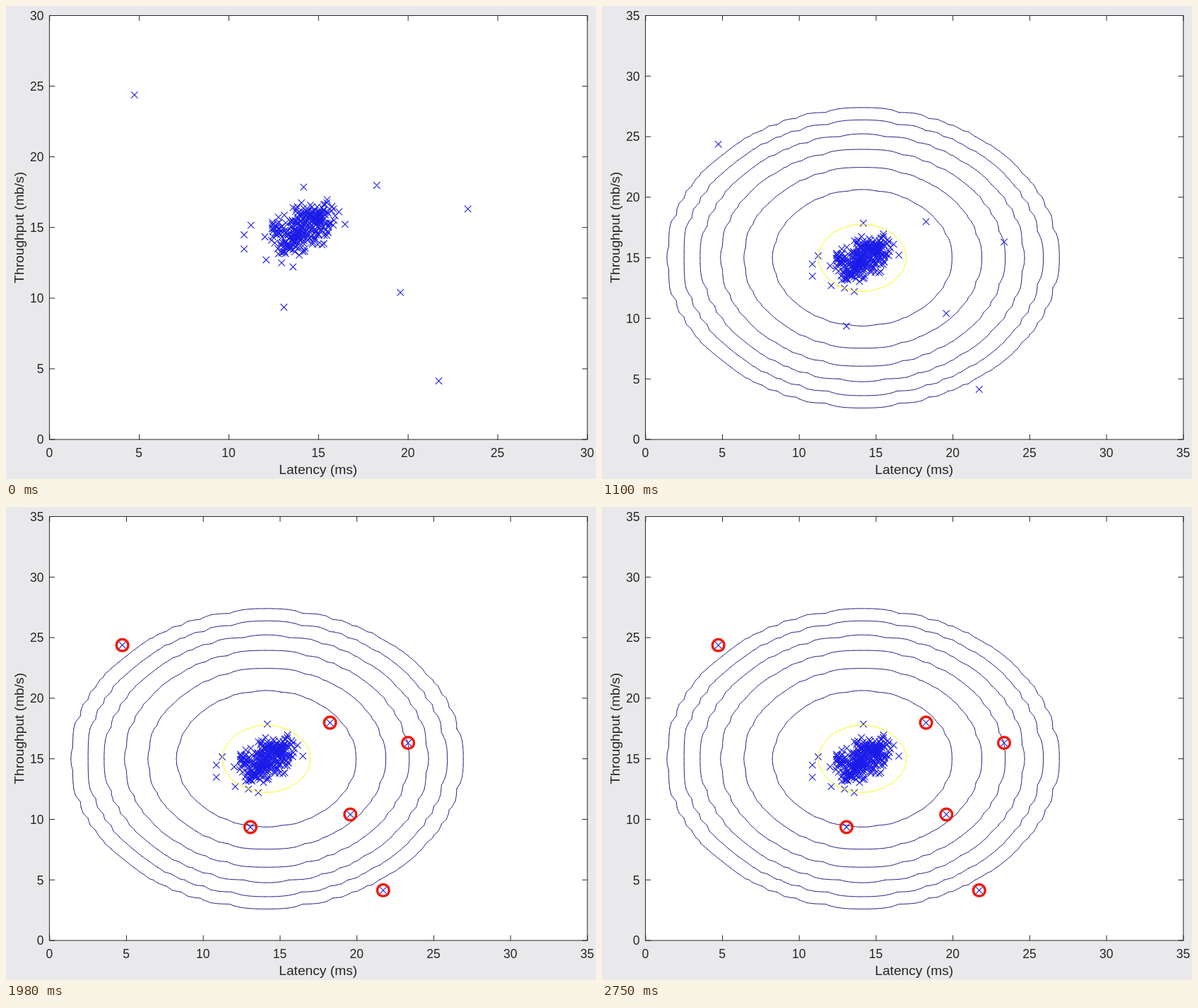
These frames come from a looping animation (835x670 px, 2860 ms). An HTML page:

```html
<!DOCTYPE html>
<html lang="en">
<head>
<meta charset="utf-8">
<title>Latency and throughput</title>
<style>
  html, body { margin: 0; width: 100%; height: 100%; overflow: hidden; background: #e9e9eb; }
  svg { display: block; width: 835px; height: 670px; }
  text { font-family: "Liberation Sans", Arial, sans-serif; fill: #262626; }
  .tick { font-size: 17.5px; }
  .label { font-size: 19.2px; text-anchor: middle; }
  path, circle { fill: none; }
</style>
</head>
<body>
<svg id="stage" viewBox="0 0 835 670"></svg>
<script>
const LOOP = 2860, CONTOURS_AT = 770, RINGS_AT = 1540;
const BOX = { l: 61.8, t: 13.5, r: 822.8, b: 614 };
const MEAN = [14.11, 15], VARIANCE = [1.833, 1.71];
const svg = document.getElementById("stage");

const scaleX = max => v => BOX.l + v / max * (BOX.r - BOX.l);
const scaleY = max => v => BOX.b - v / max * (BOX.b - BOX.t);

// Latency, throughput
const outliers = [[4.73, 24.38], [18.25, 17.98], [23.33, 16.31],
  [19.57, 10.4], [13.07, 9.36], [21.71, 4.14]];
const fringe = [[10.85, 14.48], [10.85, 13.48], [11.23, 15.16], [12.08, 12.71],
  [12.94, 12.5], [13.58, 12.21], [14.17, 17.86], [16.48, 15.23]];

function seeded(seed) {
  return () => {
    seed = (seed * 1664525 + 1013904223) % 4294967296;
    return seed / 4294967296;
  };
}

// Correlated normal cloud, cut off at a fixed radius.
function makeCloud(count) {
  const rand = seeded(71), tilt = 0.4, limit = 2.35, pts = [];
  while (pts.length < count) {
    const r = Math.sqrt(-2 * Math.log(1 - rand())), a = rand() * 2 * Math.PI;
    if (r > limit) continue;
    const g = r * Math.cos(a), h = r * Math.sin(a);
    pts.push([MEAN[0] + 0.92 * g, MEAN[1] + 0.9 * (tilt * g + Math.sqrt(1 - tilt * tilt) * h)]);
  }
  return pts;
}
const points = [...outliers, ...fringe, ...makeCloud(293)];

const density = (x, y) =>
  Math.exp(-((x - MEAN[0]) ** 2 / VARIANCE[0] + (y - MEAN[1]) ** 2 / VARIANCE[1]) / 2) /
  (2 * Math.PI * Math.sqrt(VARIANCE[0] * VARIANCE[1]));

// Linear interpolation on a half-unit grid gives the rippled outlines.
function contour(level, X, Y) {
  const step = 0.5;
  let d = "";
  for (let x = 0; x < 35; x += step) {
    for (let y = 0; y < 35; y += step) {
      const corners = [[x, y], [x + step, y], [x + step, y + step], [x, y + step]];
      const vals = corners.map(c => density(...c));
      const cuts = [];
      for (let i = 0; i < 4; i++) {
        const j = (i + 1) % 4, p = corners[i], q = corners[j];
        if ((vals[i] < level) === (vals[j] < level)) continue;
        const f = (level - vals[i]) / (vals[j] - vals[i]);
        cuts.push(X(p[0] + f * (q[0] - p[0])).toFixed(2) + " " + Y(p[1] + f * (q[1] - p[1])).toFixed(2));
      }
      if (cuts.length > 1) d += `M${cuts[0]}L${cuts[1]}`;
    }
  }
  return d;
}

const path = (d, color, width = 1) =>
  `<path d="${d}" stroke="${color}" stroke-width="${width}" stroke-linecap="round"/>`;

function axes(max, X, Y) {
  const { l, t, r, b } = BOX;
  let d = `M${l} ${t}H${r}V${b}H${l}Z`, labels = "";
  for (let v = 0; v <= max; v += 5) {
    const x = X(v), y = Y(v);
    d += `M${x} ${b}v-7M${x} ${t}v7M${l} ${y}h7M${r} ${y}h-7`;
    labels += `<text class="tick" x="${x - 0.4}" y="638.5" text-anchor="middle">${v}</text>` +
      `<text class="tick" x="53.5" y="${y + 6.4}" text-anchor="end">${v}</text>`;
  }
  return path(d, "#262626") + labels +
    `<text class="label" x="441.7" y="663">Latency (ms)</text>` +
    `<text class="label" transform="translate(24.8 313.8) rotate(-90)">Throughput (mb/s)</text>`;
}

function cross(x, y) {
  const s = 4.4;
  return path(`M${x - s} ${y - s}l${2 * s} ${2 * s}m0 ${-2 * s}l${-2 * s} ${2 * s}`, "#1c1ce8", 1.1);
}

function chart(max, withContours) {
  const X = scaleX(max), Y = scaleY(max);
  let out = `<rect width="835" height="670" fill="#e9e9eb"/>` +
    `<rect x="${BOX.l}" y="${BOX.t}" width="${BOX.r - BOX.l}" height="${BOX.b - BOX.t}" fill="#fff"/>` +
    axes(max, X, Y) + points.map(([x, y]) => cross(X(x), Y(y))).join("");
  if (withContours) {
    for (let e = -20; e < 0; e += 3)
      out += path(contour(10 ** e, X, Y), e === -2 ? "#fafa1e" : "#352a87");
  }
  return `<g>${out}</g>`;
}

const X35 = scaleX(35), Y35 = scaleY(35);
const rings = outliers.map(([x, y]) =>
  `<circle cx="${X35(x)}" cy="${Y35(y)}" r="8.4" stroke="#f01a0c" stroke-width="3.5"/>`).join("");

svg.innerHTML = chart(30, false) + chart(35, true) + `<g>${rings}</g>`;
const [scatter, fitted, flagged] = svg.children;

const show = (el, on) => el.setAttribute("display", on ? "inline" : "none");

function render(t) {
  show(scatter, t < CONTOURS_AT);
  show(fitted, t >= CONTOURS_AT);
  show(flagged, t >= RINGS_AT);
}

const start = performance.now();
function frame() {
  render((performance.now() - start) % LOOP);
  requestAnimationFrame(frame);
}
render(0);
requestAnimationFrame(frame);
</script>
</body>
</html>
```
